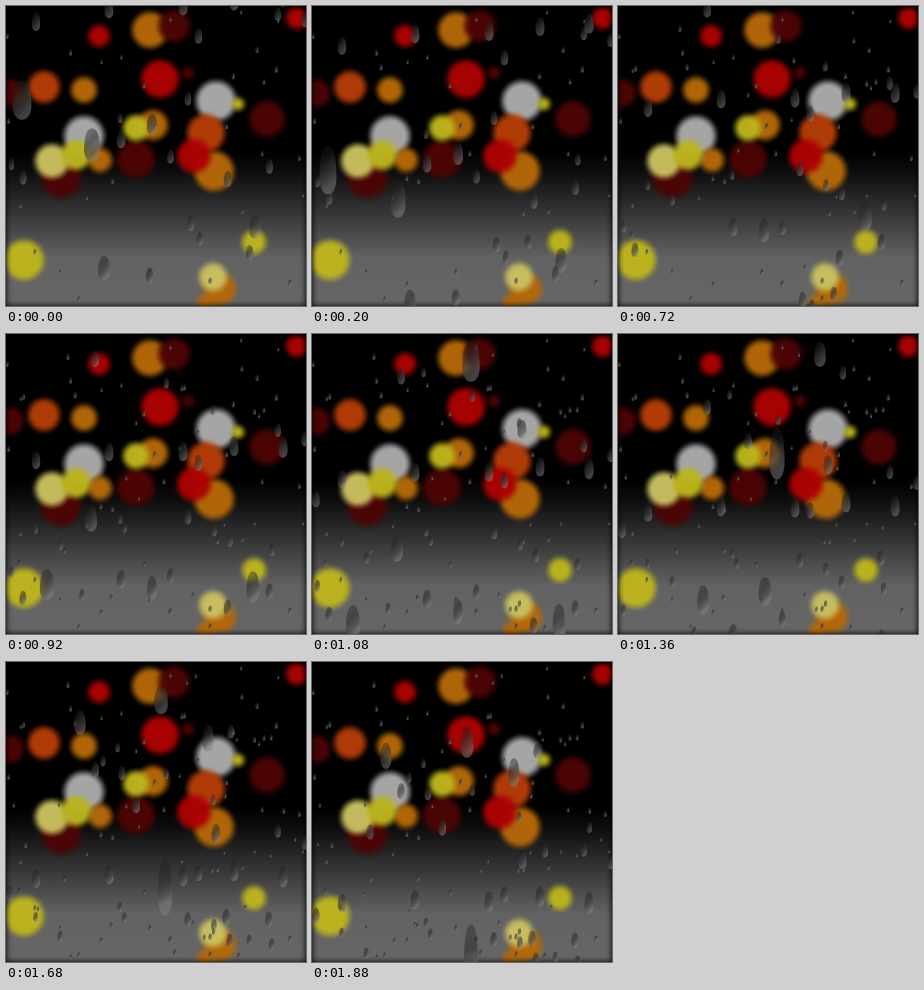
Animation, 300 px wide and 300 px high, one loop 1920 ms. Source, as an HTML page with a canvas:

```html
<!DOCTYPE html>
<html lang="en">
<head>
<meta charset="utf-8">
<title>Rain on a window</title>
<style>
html, body { margin: 0; width: 100%; height: 100%; overflow: hidden; background: #000; }
canvas { display: block; width: 300px; height: 300px; }
</style>
</head>
<body>
<canvas id="stage" width="300" height="300"></canvas>
<script>
const SIZE = 300, LOOP = 1920, STEP = 40;
const stage = document.getElementById('stage').getContext('2d');

const RED = '#ac0202', MAROON = '#4c0404', ORANGE = '#b46808', RUST = '#b43c06';
const YELLOW = '#bcb41c', CREAM = '#c8c060', WHITE = '#aaaaaa';

// Street lights by colour, back to front: x, y, radius
const lights = [
  [MAROON, [261, 113, 19], [130, 153, 20], [55, 172, 21], [4, 87, 15], [182, 67, 7]],
  [WHITE, [210, 95, 21], [78, 130, 21]],
  [ORANGE, [144, 24, 19], [208, 165, 21], [78, 84, 14], [147, 119, 16],
    [94, 154, 13], [214, 283, 17], [200, 297, 10]],
  [MAROON, [168, 20, 17]],
  [RUST, [38, 81, 17], [200, 127, 20]],
  [RED, [93, 30, 12], [291, 12, 12], [154, 73, 20], [188, 150, 18]],
  [CREAM, [46, 155, 18], [207, 271, 15]],
  [YELLOW, [70, 149, 16], [130, 122, 14], [232, 98, 7], [18, 254, 21], [248, 236, 13]]
];

// Large drops: x, y, size, birth
const largeDrops = [
  [30, 16, 4.7, 0], [103, 3, 4.9, 0], [177, 0, 5, 0], [16, 94, 10.4, 0],
  [86, 139, 8.8, 0], [146, 118, 5.7, 0], [115, 133, 4.8, 0], [98, 262, 6.5, 0],
  [249, 221, 6.3, 0], [228, -5, 5, 0], [277, -9, 5.2, 0], [247, 198, 7.5, 660],
  [85, 181, 6.8, 900], [41, 246, 8, 900], [159, 1, 10, 1000], [210, 85, 5, 1000],
  [147, 233, 7.3, 1240], [202, 1, 6.5, 1250], [74, 27, 6.3, 1480], [155, 38, 7.5, 1680]
];

function seeded(seed) {
  return () => {
    seed = seed * 16807 % 2147483647;
    return seed / 2147483647;
  };
}

const random = seeded(7219);

// Some drops are there at once, the others gather through the loop.
function scatter(count, atOnce, minSize, maxSize) {
  return Array.from({ length: count }, (_, i) => [
    random() * SIZE,
    random() * SIZE,
    minSize + random() * (maxSize - minSize),
    i < atOnce ? 0 : (i - atOnce + 1) / (count - atOnce + 1) * LOOP
  ]);
}

const smallDrops = scatter(38, 14, 2.6, 4.4);
const beads = scatter(84, 28, 1.1, 1.8);

function fade(ctx, x0, y0, x1, y1, stops) {
  const g = ctx.createLinearGradient(x0, y0, x1, y1);
  stops.forEach(([at, colour]) => g.addColorStop(at, colour));
  ctx.fillStyle = g;
}

// A disc whose rim eases from full colour to nothing.
function drawLight(ctx, colour, [x, y, r]) {
  const inner = Math.max(0, r - 7), outer = r + 4;
  const g = ctx.createRadialGradient(x, y, inner, x, y, outer);
  for (let i = 0; i <= 8; i++) {
    const alpha = 0.97 * (1 + Math.cos(Math.PI * i / 8)) / 2;
    g.addColorStop(i / 8, colour + Math.round(alpha * 255).toString(16).padStart(2, '0'));
  }
  ctx.fillStyle = g;
  ctx.fillRect(x - outer, y - outer, 2 * outer, 2 * outer);
}

function paintScene() {
  const canvas = document.createElement('canvas');
  canvas.width = canvas.height = SIZE;
  const ctx = canvas.getContext('2d');
  fade(ctx, 0, 0, 0, SIZE, [[0.48, '#000'], [0.55, '#0c0c0c'], [0.84, '#626262'], [1, '#666']]);
  ctx.fillRect(0, 0, SIZE, SIZE);
  for (const [colour, ...discs] of lights) {
    discs.forEach(disc => drawLight(ctx, colour, disc));
  }
  const half = SIZE / 2;
  for (const [x, y] of [[0, -1], [0, 1], [-1, 0], [1, 0]]) {
    fade(ctx, half + x * half, half + y * half, half + x * (half - 6), half + y * (half - 6),
      [[0, 'rgba(0,0,0,.5)'], [0.5, 'rgba(0,0,0,.15)'], [1, 'rgba(0,0,0,0)']]);
    ctx.fillRect(0, 0, SIZE, SIZE);
  }
  return canvas;
}

function drawDrop(x, y, rx, ry) {
  fade(stage, x - rx, y - ry * 0.4, x + rx, y + ry * 0.4, [
    [0, 'rgba(30,30,30,.4)'], [0.35, 'rgba(50,50,50,.64)'],
    [0.75, 'rgba(82,82,82,.64)'], [1, 'rgba(130,130,130,.5)']
  ]);
  stage.beginPath();
  stage.moveTo(x, y - ry);
  stage.bezierCurveTo(x + rx * 0.9, y - ry, x + rx, y - ry * 0.1, x + rx, y + ry * 0.3);
  stage.bezierCurveTo(x + rx, y + ry * 1.23, x - rx, y + ry * 1.23, x - rx, y + ry * 0.3);
  stage.bezierCurveTo(x - rx, y - ry * 0.1, x - rx * 0.9, y - ry, x, y - ry);
  stage.fill();
}

// Heavier drops fall faster, growing longer and thinner as they go.
function drawRunner([x, y, size, birth], t) {
  const age = t - birth;
  if (age < 0) return;
  const speed = 0.06 + 0.0027 * size * size;
  const pull = Math.min(1, Math.max(0, speed - 0.12) * age / 110);
  drawDrop(x, y + speed * age, size * (0.9 - 0.2 * pull), size * (1.9 + pull));
}

function drawBead([x, y, size, birth], t) {
  if (t < birth) return;
  drawDrop(x, y, size, size * 2);
  stage.fillStyle = 'rgba(140,140,140,.35)';
  stage.fillRect(x, y, 1, 2);
}

const scene = paintScene();

function draw(now) {
  const t = Math.floor(now % LOOP / STEP) * STEP;
  stage.drawImage(scene, 0, 0);
  beads.forEach(bead => drawBead(bead, t));
  smallDrops.forEach(drop => drawRunner(drop, t));
  largeDrops.forEach(drop => drawRunner(drop, t));
}

const start = performance.now();
function tick() {
  draw(performance.now() - start);
  requestAnimationFrame(tick);
}
tick();
</script>
</body>
</html>
```
